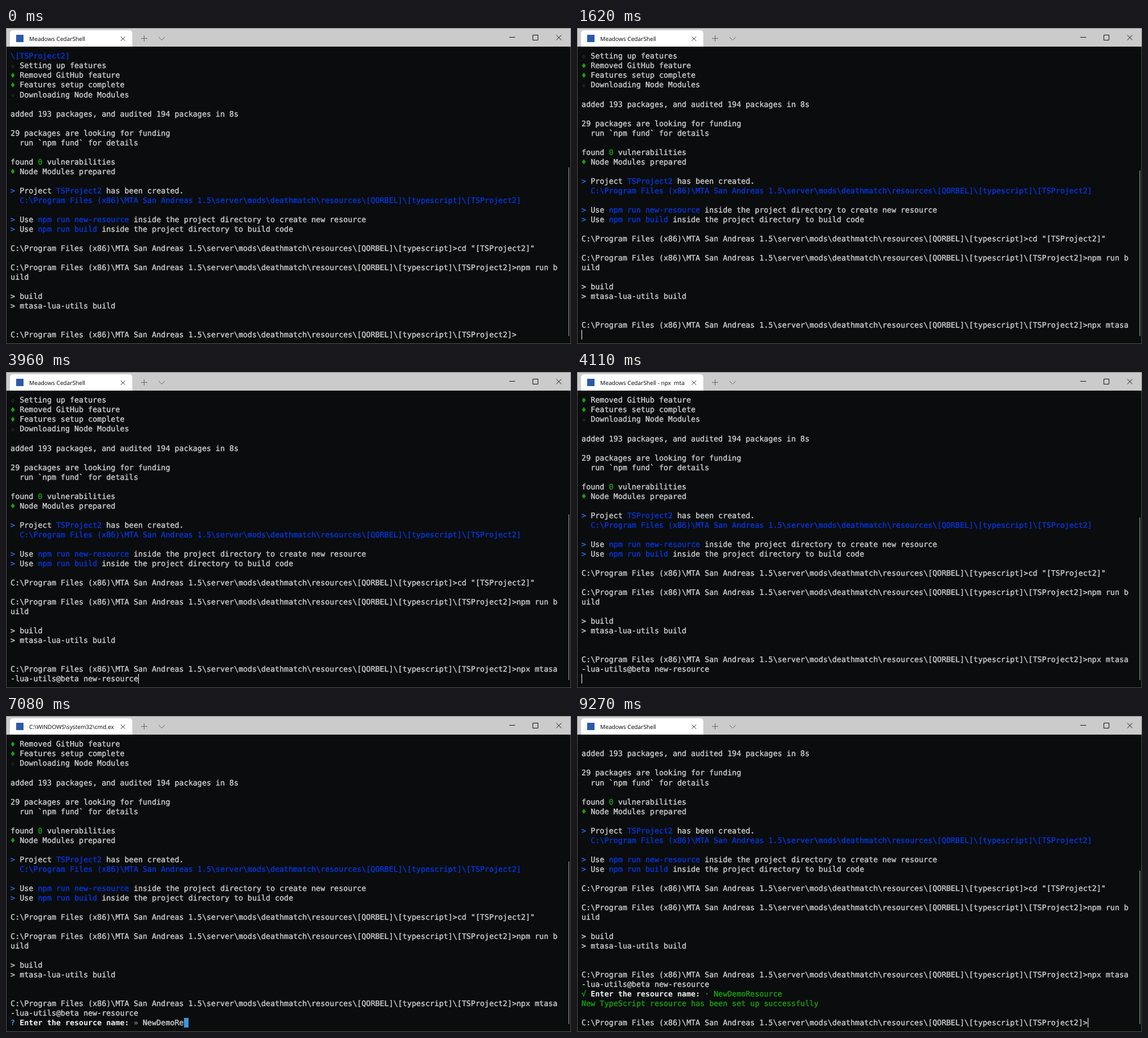
Write an HTML page with a canvas that moves like this. It is 1000 by 560 pixels and loops after 9300 ms.

```html
<!DOCTYPE html>
<html lang="en">
<head>
<meta charset="utf-8">
<title>Terminal session</title>
<style>
  html, body { margin: 0; width: 100%; height: 100%; overflow: hidden; background: #0b0c0d; }
  canvas { display: block; width: 1000px; height: 560px; }
</style>
</head>
<body>
<canvas id="stage" width="1000" height="560"></canvas>
<script>
const ctx = document.getElementById('stage').getContext('2d');
ctx.textRendering = 'geometricPrecision';
ctx.lineJoin = 'round';

const LOOP = 9300;
const ROWS = 30, COLS = 120;
const CELL = { x: 8.1, y: 41.2, w: 8.067, h: 17.03, baseline: 13.2 };
const MONO = '13.4px "DejaVu Sans Mono", monospace';
const UI = '10.2px "Open Sans", sans-serif';
const INK = 0.4; // extra outline that thickens the regular weight
const SHELL = 'Meadows CedarShell';

// Style codes follow a § sign inside terminal lines.
const STYLES = {
  w: '#cccccc', b: '#0037da', a: '#2a6ae0', g: '#13a10e',
  d: '#3c3c3c', s: '#767676', c: '#3a96dd', W: '#f2f2f2'
};
const BOLD = 'cW';

const ROOT = String.raw`C:\Program Files (x86)\MTA San Andreas 1.5\server\mods\deathmatch\resources\[QORBEL]\[typescript]`;
const PROJECT = ROOT + '\\[TSProject2]';
const HISTORY = [
  '§b\\[TSProject2]',
  '§d◇§w Setting up features',
  '§g♦§w Removed GitHub feature',
  '§g♦§w Features setup complete',
  '§d◇§w Downloading Node Modules',
  '',
  'added 193 packages, and audited 194 packages in 8s',
  '',
  '29 packages are looking for funding',
  '  run `npm fund` for details',
  '',
  'found §g0§w vulnerabilities',
  '§g♦§w Node Modules prepared',
  '',
  '§a>§w Project §bTSProject2§w has been created.',
  '  §b' + PROJECT,
  '',
  '§a>§w Use §bnpm run new-resource§w inside the project directory to create new resource',
  '§a>§w Use §bnpm run build§w inside the project directory to build code',
  '',
  ROOT + '>cd "[TSProject2]"',
  '',
  PROJECT + '>npm run b',
  'uild',
  '',
  '> build',
  '> mtasa-lua-utils build',
  '',
  ''
];

// Each burst of keys: first key time, last key time, key count.
const COMMAND = {
  text: 'npx mtasa-lua-utils@beta new-resource',
  bursts: [[990, 1620, 9], [1680, 1980, 5], [2130, 2400, 5], [2730, 2940, 4], [3000, 3690, 10], [3780, 3960, 4]]
};
const NAME = {
  text: 'NewDemoResource',
  bursts: [[5940, 5940, 1], [6060, 6090, 2], [6450, 7080, 6], [7170, 7410, 5], [7500, 7500, 1]]
};
const AT = { enter: 4080, npxTitle: 4110, cmdTitle: 4860, ask: 5190, submit: 7740, success: 7980, prompt: 8220 };
const CARET_ON = [[180, 720], [990, 4620], [AT.prompt, 8490], [9030, LOOP]];

function typed({ text, bursts }, t) {
  let count = 0;
  for (const [from, to, keys] of bursts) {
    for (let i = 0; i < keys; i++) {
      const when = keys > 1 ? from + (to - from) * i / (keys - 1) : from;
      if (t + 0.01 >= when) count++;
    }
  }
  return text.slice(0, count);
}

function terminalAt(t) {
  const lines = HISTORY.slice();
  const entry = PROJECT + '>' + typed(COMMAND, t);
  lines.push(entry.slice(0, COLS));
  if (entry.length >= COLS) lines.push(entry.slice(COLS));
  let col = entry.length % COLS, block = false;

  if (t >= AT.enter) {
    col = 0;
    if (t < AT.ask) lines.push('');
  }
  if (t >= AT.ask) {
    const name = typed(NAME, t);
    if (t < AT.submit) {
      lines.push('§c?§W Enter the resource name: §s»§w ' + name);
      col = 29 + name.length;
      block = true;
    } else {
      lines.push('§g√§W Enter the resource name: §s·§g ' + name);
      if (t >= AT.success) lines.push('§gNew TypeScript resource has been set up successfully');
      lines.push('');
    }
  }
  if (t >= AT.prompt) {
    lines.push(PROJECT + '>');
    col = PROJECT.length + 1;
  }
  return { lines, col, block };
}

function titleAt(t) {
  if (t < AT.npxTitle || t >= AT.prompt) return SHELL;
  return t < AT.cmdTitle ? SHELL + ' - npx  mtasa-lua-utils' : 'C:\\WINDOWS\\system32\\cmd.exe';
}

function strokePath(color, ...paths) {
  ctx.strokeStyle = color;
  ctx.lineWidth = 1;
  ctx.beginPath();
  for (const points of paths) {
    points.forEach(([x, y], i) => i ? ctx.lineTo(x, y) : ctx.moveTo(x, y));
  }
  ctx.stroke();
}

function cross(x, y, r, color) {
  strokePath(color, [[x - r, y - r], [x + r, y + r]], [[x + r, y - r], [x - r, y + r]]);
}

function diamond(x, y, rx, ry) {
  ctx.beginPath();
  ctx.moveTo(x, y - ry);
  ctx.lineTo(x + rx, y);
  ctx.lineTo(x, y + ry);
  ctx.lineTo(x - rx, y);
  ctx.closePath();
}

function drawChrome(title) {
  ctx.fillStyle = '#cbcbcb';
  ctx.fillRect(0, 0, 1000, 33);
  ctx.fillStyle = '#ffffff';
  ctx.beginPath();
  ctx.roundRect(7, 4, 216.5, 29, [5, 5, 0, 0]);
  ctx.fill();
  ctx.fillStyle = '#2c5aa8';
  ctx.fillRect(18, 12, 13, 13);

  ctx.save();
  ctx.beginPath();
  ctx.rect(40, 5, 151, 28);
  ctx.clip();
  ctx.font = UI;
  ctx.fillStyle = '#000000';
  ctx.fillText(title, 41, 23);
  ctx.restore();

  cross(207, 19, 4, '#444444');
  strokePath('#666666', [[239, 18.5], [250, 18.5]], [[244.5, 13], [244.5, 24]]);
  strokePath('#666666', [[270, 16], [275.5, 21.5], [281, 16]]);
  strokePath('#111111', [[891, 16.5], [901, 16.5]]);
  ctx.strokeRect(932.5, 12.5, 9, 9);
  cross(978.5, 17, 4.5, '#111111');
}

function drawLine(line, row) {
  const top = CELL.y + row * CELL.h;
  let style = 'w', col = 0;
  line.split(/§(.)/).forEach((part, i) => {
    if (i % 2) { style = part; return; }
    const bold = BOLD.includes(style);
    ctx.fillStyle = ctx.strokeStyle = STYLES[style];
    ctx.font = (bold ? 'bold ' : '') + MONO;
    for (const ch of part) {
      const x = CELL.x + col++ * CELL.w;
      if (ch === '♦') {
        diamond(x + 4, top + 8.6, 3.4, 4.6);
        ctx.fill();
      } else if (ch === '◇') {
        ctx.lineWidth = 1;
        diamond(x + 4, top + 10, 2.2, 2.6);
        ctx.stroke();
      } else if (ch !== ' ') {
        ctx.fillText(ch, x, top + CELL.baseline);
        ctx.lineWidth = INK;
        if (!bold) ctx.strokeText(ch, x, top + CELL.baseline);
      }
    }
  });
}

function drawCaret(t, col, row, block) {
  const x = Math.round(CELL.x + col * CELL.w);
  const y = Math.round(CELL.y + row * CELL.h);
  if (block) {
    ctx.fillStyle = STYLES.c;
    ctx.fillRect(x, y, 8, 17);
  } else if (CARET_ON.some(([from, to]) => t >= from && t < to)) {
    ctx.fillStyle = '#ffffff';
    ctx.fillRect(x, y, 1, 17);
  }
}

function render(t) {
  ctx.fillStyle = '#0b0c0d';
  ctx.fillRect(0, 0, 1000, 560);
  drawChrome(titleAt(t));

  const { lines, col, block } = terminalAt(t);
  const scroll = Math.max(0, lines.length - ROWS);
  lines.slice(scroll).forEach(drawLine);
  drawCaret(t, col, lines.length - scroll - 1, block);

  const thumbTop = 247 + scroll * 5.4;
  ctx.fillStyle = '#8a8a8a';
  ctx.fillRect(995.6, thumbTop, 1.4, 546 - thumbTop);

  ctx.strokeStyle = 'rgba(110, 110, 110, 0.75)';
  ctx.lineWidth = 1;
  ctx.strokeRect(0.5, 0.5, 999, 559);
}

const start = performance.now();
function tick() {
  render((performance.now() - start) % LOOP);
  requestAnimationFrame(tick);
}
tick();
</script>
</body>
</html>
```
